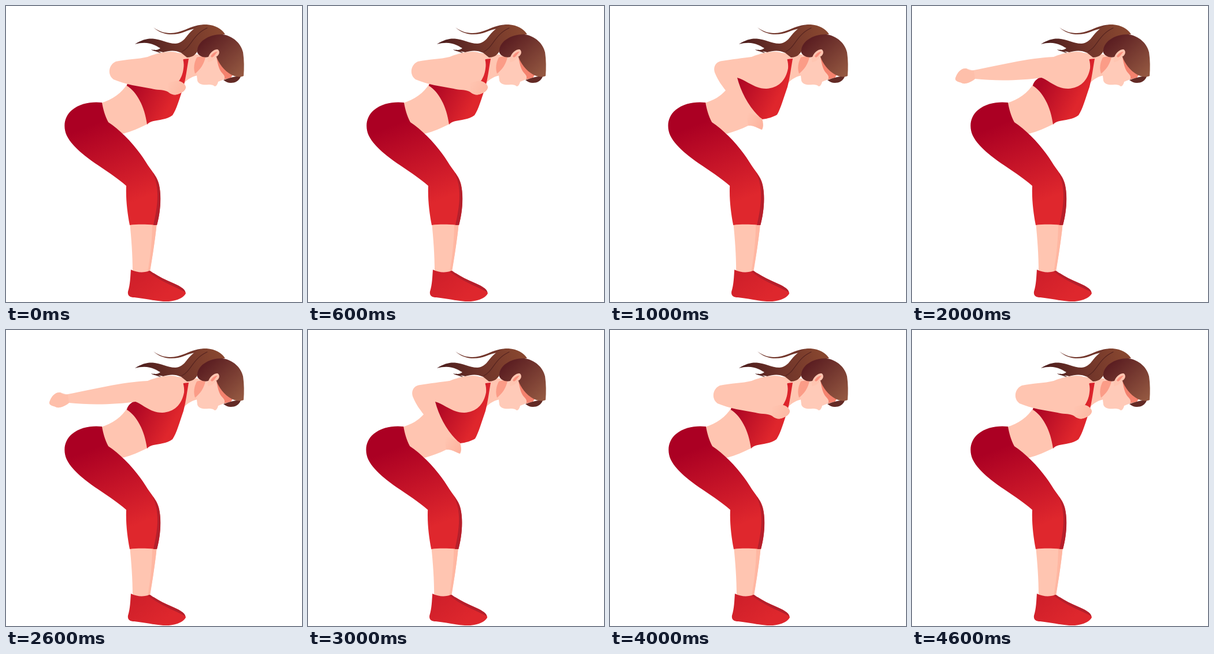
An HTML page for the animation above (5000 ms loop, 512x512 px).

```html
<!DOCTYPE html>
<html lang="en">
<head>
<meta charset="utf-8">
<title>Bent-over row</title>
<style>
  html, body { margin: 0; width: 100%; height: 100%; overflow: hidden; background: #fff; }
  svg { display: block; width: 100%; height: 100%; }
</style>
</head>
<body>
<svg viewBox="0 0 512 512">
  <defs>
    <linearGradient id="leggings" gradientUnits="userSpaceOnUse" x1="150" y1="205" x2="205" y2="345">
      <stop offset="0" stop-color="#ab0023"/><stop offset="1" stop-color="#df272d"/>
    </linearGradient>
    <linearGradient id="shoe" gradientUnits="userSpaceOnUse" x1="225" y1="460" x2="265" y2="510">
      <stop offset="0" stop-color="#cf1f2a"/><stop offset="1" stop-color="#de272d"/>
    </linearGradient>
    <linearGradient id="top" gradientUnits="userSpaceOnUse" x1="222" y1="140" x2="284" y2="172">
      <stop offset="0" stop-color="#b00825"/><stop offset="1" stop-color="#df262c"/>
    </linearGradient>
    <linearGradient id="topPulled" gradientUnits="userSpaceOnUse" x1="224" y1="136" x2="286" y2="168">
      <stop offset="0" stop-color="#b00825"/><stop offset="1" stop-color="#df262c"/>
    </linearGradient>
    <linearGradient id="tail" gradientUnits="userSpaceOnUse" x1="235" y1="70" x2="365" y2="40">
      <stop offset="0" stop-color="#4f1f1e"/><stop offset=".5" stop-color="#71352a"/><stop offset="1" stop-color="#87462f"/>
    </linearGradient>
    <linearGradient id="cap" gradientUnits="userSpaceOnUse" x1="350" y1="55" x2="408" y2="118">
      <stop offset="0" stop-color="#5c1f22"/><stop offset="1" stop-color="#945841"/>
    </linearGradient>
    <linearGradient id="hand" gradientUnits="userSpaceOnUse" x1="236" y1="190" x2="266" y2="206">
      <stop offset="0" stop-color="#ffc5b1"/><stop offset="1" stop-color="#fdb29d"/>
    </linearGradient>
    <linearGradient id="fist" gradientUnits="userSpaceOnUse" x1="278" y1="134" x2="306" y2="150">
      <stop offset="0" stop-color="#ffc5b1"/><stop offset="1" stop-color="#fdb9a4"/>
    </linearGradient>
    <path id="waist" fill="#ffc5b1" d="M164 168C184 162 200 151 211 133L238 150L245 204C231 211 217 217 202 221L172 206Z"/>
    <path id="bra" fill="url(#top)" d="M222 123C214 127 210 132 209 138C226 148 240 174 244 205C252 195 274 200 288 189C295 179 300 160 307 140C311 125 313 108 316 91L307 92L290 120Z"/>
  </defs>

  <g id="legs">
    <path fill="#ffc5b1" d="M214 374H261C258 405 253 435 248 462L219 459C219 430 217 404 214 374Z"/>
    <path fill="#ffb7a2" d="M253 374H261C258 405 253 435 249 460L245 460C250 432 253 404 253 374Z"/>
    <path fill="url(#shoe)" d="M216 456C215 469 215 481 211 494C210 501 214 504 222 504C241 506 256 510 272 511C291 512 307 506 311 497C310 489 298 483 286 478C274 473 262 467 249 458C238 462 226 461 216 456Z"/>
    <path fill="#b51f2b" d="M245 459L249 458C262 467 274 473 286 478C298 483 310 489 310 495C292 485 265 476 245 459Z"/>
  </g>

  <g id="still">
    <path fill="#ffc5b1" d="M296 81L333 84L333 120C323 121 315 126 307 134Z"/>
    <path fill="#ffcab8" d="M334 82L380 82L390 121L377 127L367 131C366 135 364 139 361 139C358 136 354 136 350 136C342 137 333 136 331 129L329 112Z"/>
    <path fill="#fb9c87" d="M330 89C335 87 341 87 345 89C342 101 336 110 327 117C324 108 325 99 330 89Z"/>
    <path fill="#f4826e" d="M364 88C371 100 383 110 393 118L389 124L377 127C380 123 377 119 373 115C368 109 366 99 364 88Z"/>
    <path fill="#632a25" d="M376 128C386 125 396 121 406 122C403 130 396 133 389 133C384 133 380 131 376 128Z"/>
    <path fill="#71352a" d="M255 37C274 51 293 48 310 41C321 36 332 32 346 32L336 40C326 38 318 41 308 45C292 51 271 52 255 37Z"/>
    <path fill="url(#tail)" d="M331 80C332 63 348 52 379 49C374 40 362 33 347 32C333 32 325 39 319 45C311 53 307 64 293 65C270 65 255 45 223 66C243 61 254 65 267 73C262 77 256 77 251 75C256 80 265 78 272 80C283 77 292 76 303 81L313 89C323 89 328 84 332 77Z"/>
    <path fill="none" stroke="#55231f" stroke-width="1.2" stroke-linecap="round" d="M304 79C320 72 322 50 348 38M256 76C262 80 266 79 270 83"/>
    <path fill="url(#cap)" d="M331 81C329 62 350 49 374 49C394 52 407 66 410 80C412 93 412 108 411 121C403 124 396 122 390 119C377 112 368 99 364 88L350 88C344 90 335 88 331 81Z"/>
    <path fill="#ffc5b1" d="M349 91C352 81 359 75 366 75C371 78 369 86 363 88C360 93 355 97 349 97Z"/>
    <path fill="#f9917f" d="M354 87C357 82 361 79 366 79C362 83 361 87 356 89Z"/>
  </g>

  <g class="pose">
    <use href="#waist"/>
    <use href="#bra"/>
    <path fill="#ffc5b1" d="M190 96C208 92 229 92 245 88C263 81 280 77 294 80C305 84 309 94 307 108C306 117 303 124 299 130C305 132 311 136 311 141C310 146 306 149 301 151C294 155 287 154 281 149C273 144 263 146 252 143C230 139 207 136 186 127C175 119 177 102 190 96Z"/>
    <path fill="url(#fist)" d="M280 133C288 131 293 129 300 130C306 132 311 136 311 141C310 146 306 149 301 151C294 155 287 154 281 149Z"/>
  </g>

  <g class="pose">
    <path fill="#ffc5b1" d="M163 168C180 163 191 156 200 146C193 137 187 129 182 117C177 106 183 96 194 95C212 92 230 90 245 88L280 140L263 196L239 207C227 213 215 217 202 221L171 206Z"/>
    <path fill="url(#topPulled)" d="M220 124C227 150 241 177 263 196C273 195 282 192 289 188C295 178 300 160 307 140C311 125 313 108 316 91L307 92L285 122Z"/>
    <path fill="#ffc5b1" d="M220 98L245 88C263 81 280 77 294 80C305 84 309 94 308 108C304 129 291 142 270 143C250 143 237 129 220 124Z"/>
    <path fill="url(#hand)" d="M236 184C246 185 254 190 263 195C265 201 266 209 263 214C255 212 250 206 239 207Z"/>
  </g>

  <g class="pose">
    <use href="#waist"/>
    <use href="#bra"/>
    <path fill="#ffc5b1" d="M75 125C78 115 85 107 94 108C98 111 102 112 107 111C150 103 200 90 245 88C263 81 280 77 294 80C305 84 309 94 308 108C304 129 291 142 270 143C250 143 237 129 224 124C190 129 145 130 109 126C103 131 95 135 88 134C83 131 74 131 75 125Z"/>
    <path fill="#fdb9a4" opacity=".5" d="M75 125C78 115 85 107 94 108L107 112L109 126C103 131 95 135 88 134C83 131 74 131 75 125Z"/>
  </g>

  <g id="pants">
    <path fill="url(#leggings)" d="M166 167C149 165 128 168 114 180C101 191 98 208 105 224C113 241 134 258 154 272C172 284 192 297 208 311C207 335 210 358 214 379C230 377 247 378 261 379C267 358 269 330 265 310C262 294 250 284 242 270C226 244 200 216 177 201C171 190 168 178 166 167Z"/>
    <path fill="#b51f2b" d="M253 288C260 296 266 306 267 326C268 346 265 364 261 379H255C261 352 268 315 253 288Z"/>
  </g>
</svg>
<script>
  const STEP = 1000;
  const sequence = [0, 1, 2, 1, 0];
  const poses = document.querySelectorAll('.pose');
  const lower = ['legs', 'pants'].map(id => document.getElementById(id));

  function render(time) {
    const current = sequence[Math.floor(time / STEP) % sequence.length];
    poses.forEach((pose, i) => pose.setAttribute('display', i === current ? 'inline' : 'none'));
    // The legs sit slightly back while the elbow is pulled in.
    const shift = current === 1 ? -0.8 : 0;
    lower.forEach(part => part.setAttribute('transform', `translate(${shift} 0)`));
  }

  const start = performance.now();
  function tick() {
    render(performance.now() - start);
    requestAnimationFrame(tick);
  }
  tick();
</script>
</body>
</html>
```
